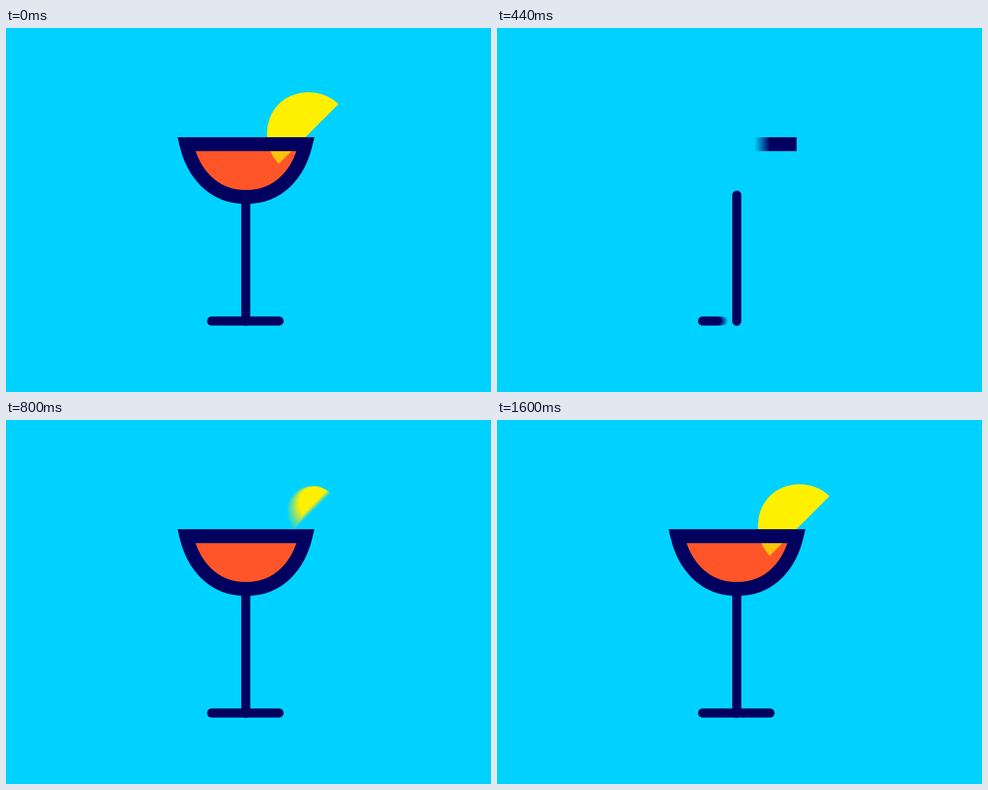
An HTML page with a canvas that plays this animation: 800 px wide and 600 px high, repeating every 1.64 s.

```html
<!DOCTYPE html>
<html lang="en">
<head>
<meta charset="utf-8">
<title>Cocktail</title>
<style>
html, body { margin: 0; width: 100%; height: 100%; overflow: hidden; background: #00d2ff; }
canvas { display: block; width: 800px; height: 600px; }
</style>
</head>
<body>
<canvas id="stage" width="800" height="600"></canvas>
<script>
const W = 800, H = 600, LOOP = 1640, STEP = 40;
const SHUTTER = 20, SAMPLES = 16;
const SKY = '#00d2ff', NAVY = '#00005f', ORANGE = '#ff5528', YELLOW = '#fff000';

const ctx = document.getElementById('stage').getContext('2d');
const layer = document.createElement('canvas');
layer.width = W;
layer.height = H;
const ink = layer.getContext('2d');

const bowlData = 'M494.2 191.5H297.5C308 236.3 339 278.5 395.9 278.5C452.8 278.5 483.7 236.3 494.2 191.5Z';
const bowl = new Path2D(bowlData);
const probe = document.createElementNS('http://www.w3.org/2000/svg', 'path');
probe.setAttribute('d', bowlData);
const bowlLength = probe.getTotalLength();

const progress = (t, start, span) => Math.min(1, Math.max(0, (t - start) / span));
const ease = x => x * x * (3 - 2 * x);

const stemPart = t => ease(progress(t, 130, 300));
const basePart = t => ease(progress(t, 360, 240));
const bowlPart = t => ease(progress(t, 360, 375));
const fillPart = t => progress(t, 670, 110);

// Linear growth, then a damped bounce around the final radius.
function lemonRadius(t) {
  const rest = 69.5, s = (t - 840) / 1000;
  if (s < 0) return rest * progress(t, 760, 80);
  return rest + 39.7 * Math.sin(6 * Math.PI * s) * Math.exp(-10.9 * s);
}

function line(c, x1, y1, x2, y2) {
  c.lineWidth = 15;
  c.lineCap = 'round';
  c.beginPath();
  c.moveTo(x1, y1);
  c.lineTo(x2, y2);
  c.stroke();
}

function drawStem(c, p) {
  c.strokeStyle = NAVY;
  line(c, 395.5, 275.5, 395.5, 275.5 + 208 * p);
}

function drawBase(c, p) {
  c.strokeStyle = NAVY;
  line(c, 339, 483, 339 + 111.5 * p, 483);
}

function drawBowl(c, p) {
  c.strokeStyle = NAVY;
  c.lineWidth = 23;
  c.lineCap = 'butt';
  c.lineJoin = 'miter';
  if (p < 1) c.setLineDash([bowlLength * p, bowlLength * 2]);
  c.stroke(bowl);
}

function drawFill(c, p) {
  c.beginPath();
  c.rect(280, 280 - 90 * p, 230, 90 * p);
  c.clip();
  c.fillStyle = ORANGE;
  c.fill(bowl);
}

function drawLemon(c, r) {
  c.translate(515.8 - 0.24 * r, 112 + 0.9 * r);
  c.rotate(-Math.PI / 4);
  c.scale(r, r);
  c.fillStyle = YELLOW;
  c.beginPath();
  c.moveTo(1, 0);
  c.bezierCurveTo(1, -0.5, 0.552, -1, 0, -1);
  c.bezierCurveTo(-0.552, -1, -1, -0.5, -1, 0);
  c.closePath();
  c.fill();
}

function sample(c, draw, value, alpha) {
  if (value <= 0) return;
  c.save();
  c.globalAlpha = alpha;
  draw(c, value);
  c.restore();
}

// Averages a shape over the shutter time into the spare layer.
function blur(draw, part, t) {
  ink.clearRect(0, 0, W, H);
  const from = part(t - SHUTTER / 2), to = part(t + SHUTTER / 2);
  if (from === to) {
    sample(ink, draw, from, 1);
    return;
  }
  ink.globalCompositeOperation = 'lighter';
  for (let i = 0; i < SAMPLES; i++) {
    const at = t + SHUTTER * ((i + 0.5) / SAMPLES - 0.5);
    sample(ink, draw, part(at), 1 / SAMPLES);
  }
  ink.globalCompositeOperation = 'source-over';
}

function add(draw, part, t) {
  blur(draw, part, t);
  ctx.drawImage(layer, 0, 0);
}

function render(time) {
  const frame = Math.floor((time + 4) / STEP) * STEP % LOOP;
  const t = frame || LOOP;

  ctx.fillStyle = SKY;
  ctx.fillRect(0, 0, W, H);

  add(drawLemon, lemonRadius, t);
  add(drawFill, fillPart, t);

  // The part of the lemon dipped in the drink shows through it.
  blur(drawLemon, lemonRadius, t);
  ctx.save();
  ctx.clip(bowl);
  ctx.globalAlpha = 0.7;
  ctx.drawImage(layer, 0, 0);
  ctx.restore();

  add(drawStem, stemPart, t);
  add(drawBase, basePart, t);
  add(drawBowl, bowlPart, t);
}

let start = null;
function tick(now) {
  if (start === null) start = now;
  render(now - start);
  requestAnimationFrame(tick);
}

render(0);
requestAnimationFrame(tick);
</script>
</body>
</html>
```
